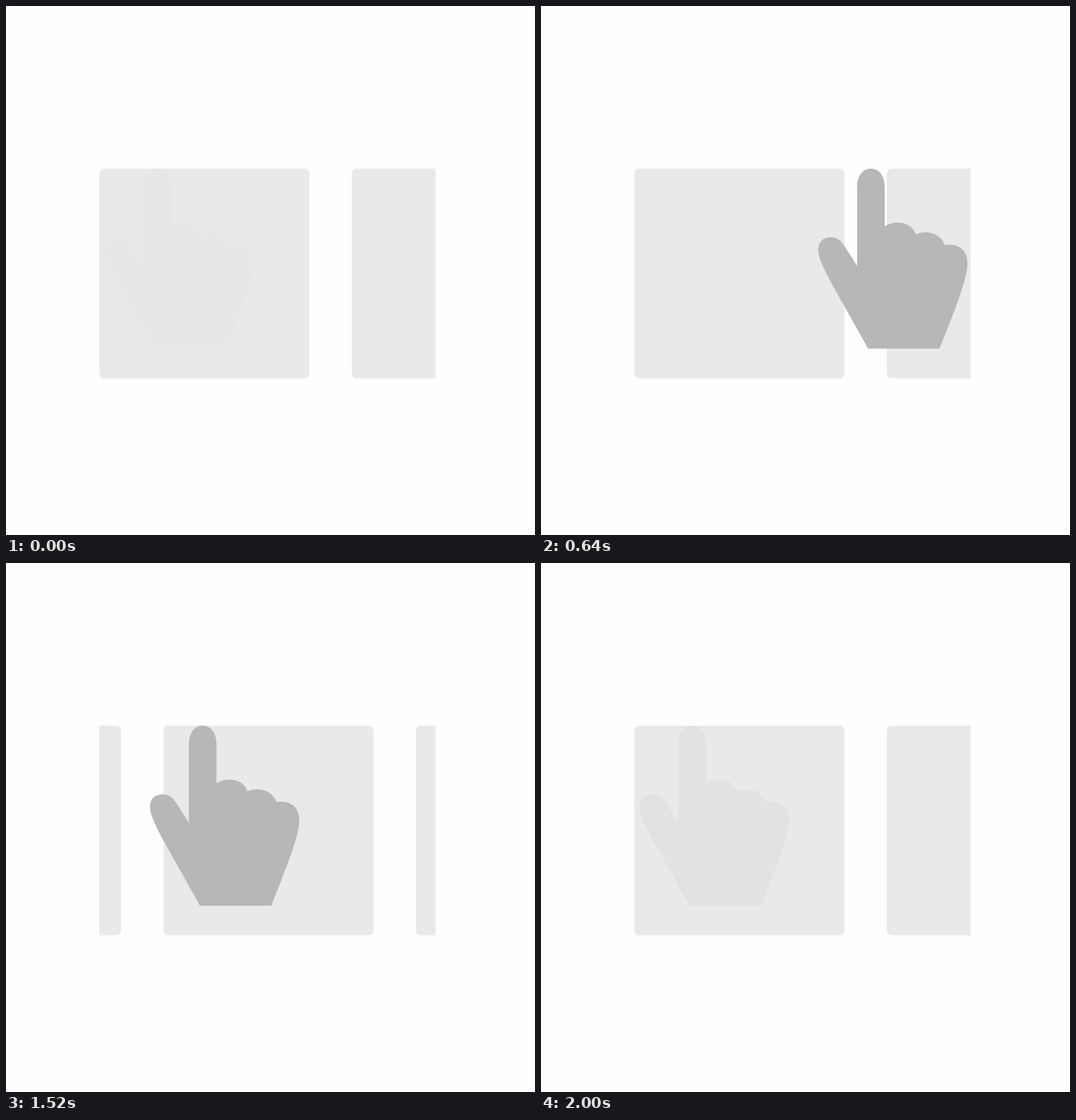
Recreate the animation shown at these times as an HTML page. Size 748 by 748 pixels, loop 2.04 s.

```html
<!DOCTYPE html>
<html lang="en">
<head>
<meta charset="utf-8">
<title>Swipe gesture</title>
<style>
  html, body { margin: 0; width: 100%; height: 100%; overflow: hidden; background: #fefefe; }
  svg { display: block; width: 100%; height: 100%; }
</style>
</head>
<body>
<svg viewBox="0 0 748 748">
  <clipPath id="viewport"><rect x="132" y="220" width="475.5" height="320"/></clipPath>
  <g clip-path="url(#viewport)">
    <g id="cards" fill="#ebe8eb">
      <rect x="132" y="230" width="297" height="296.5" rx="6.5"/>
      <rect x="489" y="230" width="297" height="296.5" rx="6.5"/>
      <rect x="846" y="230" width="297" height="296.5" rx="6.5"/>
    </g>
  </g>
  <path id="hand" fill="#b8b6b7" d="M462.5 484.5 L427 421 C411 392 392 361 392 345
    C392 333 399 327 410 327 C418 327 424 331 429 339 L447 367.5
    V256 C447 240 455 230 466.5 230 S486 240 486 256 V311.5
    C501 302 524 305 530 323 C546 316 565 322 571 338
    C592 335 603 346 603 364 C603 387 582 438 563.5 484.5 Z"/>
</svg>
<script>
  const LOOP = 2040, STEP = 40;
  const CARD_PITCH = 357, HAND_TRAVEL = 252.5;
  const START_SCALE = 5 / 3, PIVOT = { x: 603.5, y: 230 };
  const cards = document.getElementById('cards');
  const hand = document.getElementById('hand');

  // Cubic ease-in-out progress between two times.
  function progress(time, start, end) {
    const u = Math.min(1, Math.max(0, (time - start) / (end - start)));
    return u < 0.5 ? 4 * u ** 3 : 1 - 4 * (1 - u) ** 3;
  }

  function draw(time) {
    // The fading hand lingers for the first two steps of the loop.
    const t = time < 80 ? LOOP : time;
    const press = progress(t, 207, 640);
    const swipe = progress(t, 1169, 1753);
    const opacity = progress(t, 60, 380) * (1 - progress(t, 1754, 2118));
    const scale = START_SCALE + (1 - START_SCALE) * press;
    const x = PIVOT.x * (1 - scale) - HAND_TRAVEL * swipe;
    const y = PIVOT.y * (1 - scale);

    cards.setAttribute('transform', `translate(${-CARD_PITCH * swipe} 0)`);
    hand.setAttribute('transform', `translate(${x} ${y}) scale(${scale})`);
    hand.setAttribute('opacity', opacity);
  }

  const origin = performance.now();
  function tick() {
    const elapsed = (performance.now() - origin) % LOOP;
    draw(Math.floor(elapsed / STEP) * STEP);
    requestAnimationFrame(tick);
  }
  tick();
</script>
</body>
</html>
```
